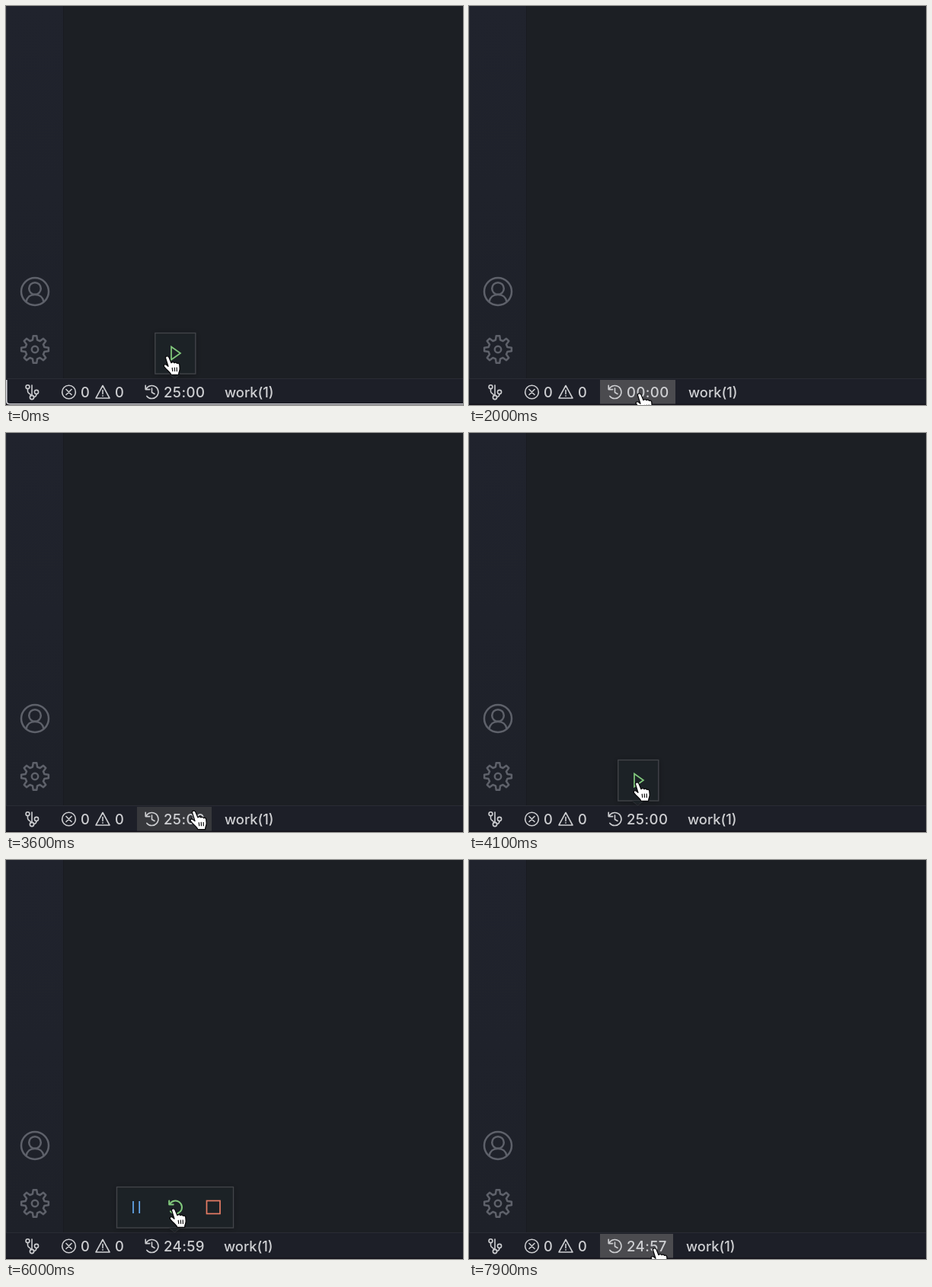
Animation of 600 by 524 pixels, one loop 8000 ms. Source, as an HTML page:

```html
<!DOCTYPE html>
<html lang="en">
<head>
<meta charset="utf-8">
<title>Status bar timer</title>
<style>
  html, body { margin: 0; width: 100%; height: 100%; overflow: hidden; background: #1c1f24; }
  svg { display: block; width: 600px; height: 524px; }
  text { font: 500 18.3px Inter, Roboto, sans-serif; fill: #cfd0d3; white-space: pre; }
  #time { font-size: 18.6px; letter-spacing: .4px; }
  .line { fill: none; stroke-linecap: round; stroke-linejoin: round; }
  .side { stroke: #5e616a; stroke-width: 2.5; }
  .bar { stroke: #cdced1; stroke-width: 1.6; }
  .sharp { fill: none; stroke-width: 1.7; }
  .box { fill: #1d2025; stroke: #43454a; stroke-width: 1.3; }
  .green { stroke: #82ca7d; }
  .blue { stroke: #65aaf0; }
  .red { stroke: #e77c65; }
</style>
</head>
<body>
<svg viewBox="0 0 600 524">
  <defs>
    <linearGradient id="sideFill" x2="0" y2="1">
      <stop stop-color="#20232d"/><stop offset="1" stop-color="#1e2129"/>
    </linearGradient>
    <filter id="shade" x="-20%" y="-30%" width="140%" height="160%">
      <feDropShadow dx="0" dy="1" stdDeviation="4" flood-color="#000" flood-opacity=".3"/>
    </filter>
    <g id="turn">
      <path d="M-7.4 -4.2A8.5 8.5 0 1 1 -6.6 5.4"/>
      <path d="M-8.3 -8.6V-3.4H-2.8"/>
    </g>
    <path id="beak" d="M214 483L221.5 489L229 483" fill="#1d2025" stroke="#2d2f34"/>
  </defs>

  <rect width="600" height="524" fill="#1c1f24"/>
  <rect width="75" height="490" fill="url(#sideFill)"/>
  <path d="M75.5 0V489" stroke="#191b20"/>
  <path d="M.5 0V489" stroke="#2a2d36"/>

  <g class="line side">
    <circle cx="38" cy="375" r="18"/>
    <circle cx="38" cy="371" r="7.8"/>
    <path d="M26.5 388.5C27.5 382.5 32 379 38 379S48.5 382.5 49.5 388.5"/>
    <path id="gear" transform="translate(38 451)"/>
    <circle cx="38" cy="451" r="4.2"/>
  </g>

  <rect y="490" width="600" height="34" fill="#1d1f28"/>
  <path d="M0 489.5H600" stroke="#2a2c34"/>
  <path d="M0 523.3H600" stroke="#15131a" stroke-width="1.4"/>
  <path id="focus" d="M.8 491V519Q.8 522.8 5 522.8H600" fill="none" stroke="#d5d6da" stroke-width="1.6"/>
  <rect id="hover" x="172" y="491" height="31.5"/>

  <g class="line bar">
    <path d="M28.5 502.6V506C28.5 509 32 509 33 511.6M34 498V511.4M40 509.6C40 512 38 513.4 36.6 513.8"/>
    <circle cx="28.5" cy="500.2" r="2.4"/>
    <circle cx="34" cy="514" r="2.6"/>
    <circle cx="40" cy="507" r="2.6"/>
    <circle cx="82.5" cy="507" r="8.8"/>
    <path d="M79 503.5L86 510.5M86 503.5L79 510.5"/>
    <path d="M127 498.5L136 515H118ZM127 504.5V509.5M127 511.8V512.2"/>
    <use href="#turn" x="191.5" y="507"/>
    <path d="M191.5 502V507.5L195 509.5"/>
  </g>
  <text x="98" y="513.6">0</text>
  <text x="143" y="513.6">0</text>
  <text id="time" x="207" y="513.6"></text>
  <text id="task" y="513.6">work(1)</text>

  <g id="startTip">
    <g filter="url(#shade)">
      <rect class="box" x="195.8" y="429.5" width="53" height="53.5"/>
      <use href="#beak"/>
    </g>
    <path class="sharp green" d="M217 447.5L229 456L217 464.5Z"/>
  </g>
  <g id="runTip">
    <g filter="url(#shade)">
      <rect class="box" x="145.5" y="429.5" width="153" height="53.5"/>
      <use href="#beak"/>
    </g>
    <path class="sharp blue" d="M167 448V464M175.2 448V464"/>
    <g class="line green" stroke-width="2"><use href="#turn" x="222.5" y="456"/></g>
    <rect class="sharp red" x="263.5" y="447.5" width="17.5" height="17"/>
  </g>

  <g id="hand">
    <g transform="translate(-2 -.6)">
      <path d="M-1.6 1.6C-1.8 -1 2 -1.4 3 1.2L6 8.3C7 6.8 9.3 7 10 8.3C11 7.2 12.9 7.5 13.5 9C15 8.2 16.6 9 16.8 10.7L17.2 15.5C17.3 19 15.7 20 15.6 24H5.8C5 20.8 0 18 -3.4 13.2C-4.8 10.9 -2.2 9.2 0 11.2L2 12.8Z" fill="#fff" stroke="#08080a" stroke-width="1.3" stroke-linejoin="round"/>
      <path d="M7.2 14.5L7.8 19.5M10.2 14.2L10.6 19.5M13.2 14.2L13.4 19.5" stroke="#111" stroke-width="1.2"/>
    </g>
  </g>
</svg>

<script>
const LOOP = 8000, STEP = 100;
const START = 4500, WORK = 25 * 60;
const $ = id => document.getElementById(id);

// Pointer strokes: from ms, to ms, end x, end y.
const strokes = [
  [0, 200, 215, 457], [300, 600, 225, 510], [2300, 2700, 222, 496],
  [2800, 3100, 263, 498], [3100, 3300, 372, 499], [3300, 3700, 225, 497],
  [3700, 4100, 222, 460], [4100, 4200, 221, 449], [4200, 4400, 221, 459],
  [6900, 7000, 225, 471], [7000, 7300, 227, 500], [7300, 7800, 245, 511]
];

const between = (t, from, to) => t >= from && t < to;
const show = (id, on) => $(id).style.display = on ? '' : 'none';

function pointerAt(t) {
  let x = 213, y = 461;
  for (const [from, to, endX, endY] of strokes) {
    const p = Math.min(1, Math.max(0, (t - from) / (to - from)));
    const ease = p * p * (3 - 2 * p);
    x += (endX - x) * ease;
    y += (endY - y) * ease;
  }
  return [x, y];
}

function clockAt(t) {
  if (between(t, 2000, 2100)) return '00:00';
  const left = WORK - Math.max(0, Math.floor((t - START) / 1000));
  return [left / 60, left % 60].map(n => String(Math.floor(n)).padStart(2, '0')).join(':');
}

// Zeros are wide and sevens narrow, which nudges the label after the clock.
function taskLeft(label) {
  const nudge = { 0: .5, 7: -1 };
  return [...label].reduce((x, c) => x + (nudge[c] || 0), 286);
}

function gearPath(teeth, outer, inner) {
  const profile = [[-.31, inner], [-.16, outer], [.16, outer], [.31, inner]];
  const points = [];
  for (let i = 0; i < teeth; i++) {
    for (const [turn, r] of profile) {
      const a = (i + turn) * 2 * Math.PI / teeth;
      points.push((r * Math.sin(a)).toFixed(2) + ' ' + (-r * Math.cos(a)).toFixed(2));
    }
  }
  return 'M' + points.join('L') + 'Z';
}

function draw(time) {
  const t = Math.floor(time % LOOP / STEP) * STEP;
  const [x, y] = pointerAt(t);
  const label = clockAt(t);
  const left = taskLeft(label);
  const pressed = between(t, 1000, 2900) || t >= 7900;
  const running = t >= 5600;

  $('hand').setAttribute('transform', `translate(${x} ${y})`);
  $('time').textContent = label;
  $('task').setAttribute('x', left);
  $('hover').setAttribute('width', left - 17 - 172);
  $('hover').setAttribute('fill', pressed ? '#4b4b4f' : '#37383c');
  show('hover', y >= 494 && between(x, 172, 270));
  show('startTip', t < 1000 || between(t, 3700, 5600));
  show('runTip', running && !pressed);
  show('focus', t < 1100);
}

$('gear').setAttribute('d', gearPath(8, 18, 12.8));
const begin = performance.now();
function tick(now) {
  draw(Math.max(0, now - begin));
  requestAnimationFrame(tick);
}
draw(0);
requestAnimationFrame(tick);
</script>
</body>
</html>
```
